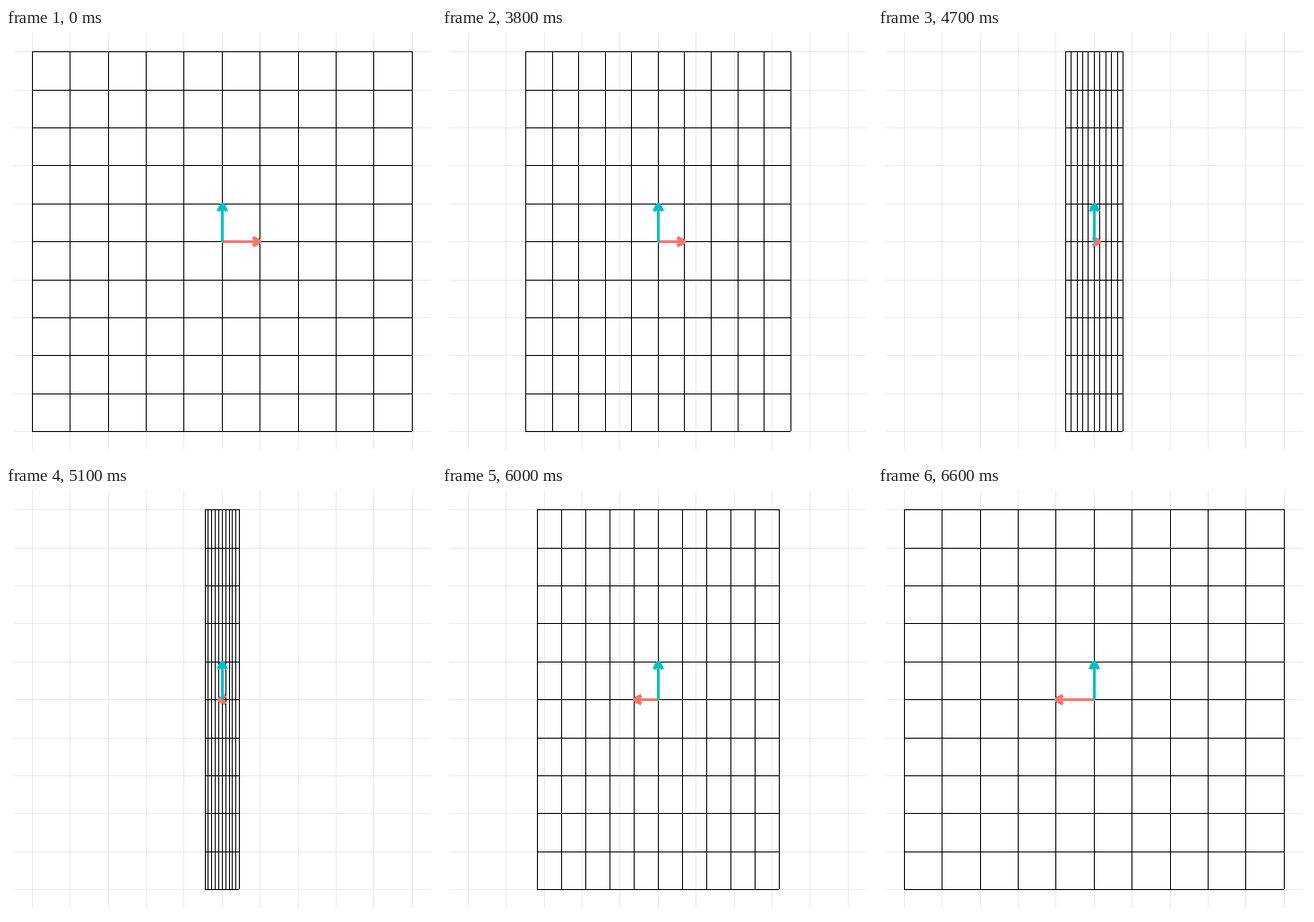
Recreate the animation shown at these times as a matplotlib script. Size 480 by 480 pixels, loop 10 s.

```python
import numpy as np
import matplotlib.pyplot as plt
from matplotlib.animation import FuncAnimation
from matplotlib.collections import LineCollection

SIZE = 480
UNIT = 42.4                # pixels per grid unit
CX, CY = 240.88, 238.2     # origin on the stage
FRAMES, INTERVAL = 100, 100
HOLD, MORPH = 33, 33       # still frames, then frames of the reflection
HEAD = 8.5                 # arrow barb length
UNITS = np.arange(-5, 6)

fig = plt.figure(figsize=(SIZE / 72, SIZE / 72), dpi=72, facecolor="white")
ax = fig.add_axes([0, 0, 1, 1])
ax.set_xlim(0, SIZE)
ax.set_ylim(SIZE, 0)
ax.axis("off")


def pixel(v):
    """Whole pixel nearest to v."""
    return np.floor(np.asarray(v) + 0.5)


def grid_segments(scale, reach_x, reach_y):
    """Crisp grid lines; the far end pixel of each line is left open."""
    xs = pixel(CX + UNITS * UNIT * scale)
    ys = pixel(CY + UNITS * UNIT)
    left, right = pixel(CX - reach_x), pixel(CX + reach_x)
    top, bottom = pixel(CY - reach_y), pixel(CY + reach_y)
    vertical = [[(x + 0.5, top), (x + 0.5, bottom)] for x in xs]
    horizontal = [[(left, y + 0.5), (right, y + 0.5)] for y in ys]
    return vertical + horizontal


def add_grid(color, zorder):
    lines = LineCollection([], colors=color, linewidths=1, capstyle="butt",
                           antialiaseds=False, snap=False, zorder=zorder)
    return ax.add_collection(lines)


def add_arrow(color, zorder):
    style = dict(color=color, lw=3, antialiased=False, snap=False,
                 solid_capstyle="butt", solid_joinstyle="round", zorder=zorder)
    return [ax.plot([], [], **style)[0] for _ in range(2)]


def set_arrow(arrow, dx, dy):
    """Point an arrow from the origin to (dx, dy) in grid units, y up."""
    shaft, head = arrow
    x0, y0 = pixel(CX) + 0.5, pixel(CY) + 0.5
    x1 = pixel(CX + dx * UNIT) + 0.5
    y1 = pixel(CY - dy * UNIT) + 0.5
    shaft.set_data([x0, x1], [y0, y1])
    back = np.arctan2(y0 - y1, x0 - x1)
    a, b = back - np.pi / 6, back + np.pi / 6
    head.set_data([x1 + HEAD * np.cos(a), x1, x1 + HEAD * np.cos(b)],
                  [y1 + HEAD * np.sin(a), y1, y1 + HEAD * np.sin(b)])


backdrop = add_grid("#EBEBEB", 1)
backdrop.set_segments(grid_segments(1, 5.5 * UNIT, 5.5 * UNIT))
grid = add_grid("black", 2)
i_hat = add_arrow("#F8766D", 3)
j_hat = add_arrow("#00BFC4", 4)
set_arrow(j_hat, 0, 1)


def update(frame):
    step = min(max(frame - HOLD, 0), MORPH)
    scale = 1 - 2 * step / MORPH
    grid.set_segments(grid_segments(scale, 5 * UNIT * abs(scale), 5 * UNIT))
    set_arrow(i_hat, scale, 0)
    return [grid, *i_hat]


anim = FuncAnimation(fig, update, frames=FRAMES, interval=INTERVAL,
                     repeat=True, repeat_delay=0, blit=False)
plt.show()
```
